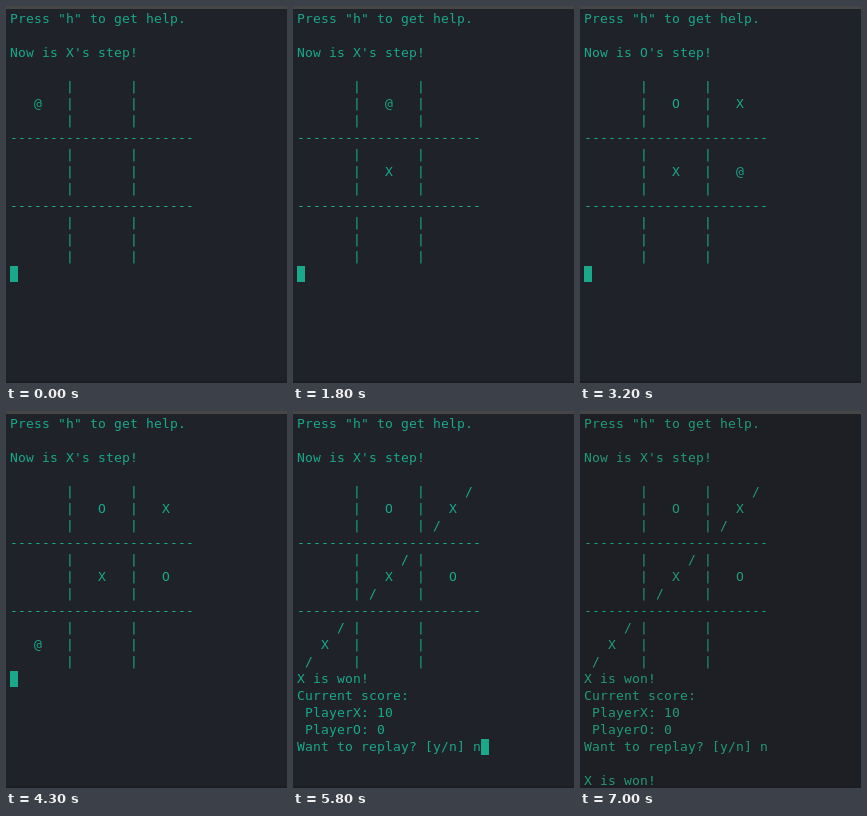
These frames come from a looping animation (281x377 px, 7400 ms). An HTML page with a canvas:

```html
<!DOCTYPE html>
<html lang="en">
<head>
<meta charset="utf-8">
<title>Terminal tic-tac-toe</title>
<style>
  html, body { margin: 0; width: 100%; height: 100%; overflow: hidden; background: #1f2229; }
  canvas { display: block; width: 281px; height: 377px; }
</style>
</head>
<body>
<canvas id="term" width="281" height="377"></canvas>
<script>
const LOOP = 7400;
const CELL = 8, LINE = 17, LEFT = 4, TOP = 5, BASE = 12;
const FONT = '13px "DejaVu Sans Mono", monospace';
const BRIGHT = { ink: '#1aa88a', paper: '#1f2229' };
const DIM = { ink: '#219a77', paper: '#1e1f24' };

// Each step changes part of the state. Squares are numbered 0-8, row by row.
const steps = [
  { at: 0, turn: 'X', pick: 0 },
  { at: 200, pick: 3 },
  { at: 500, pick: 4 },
  { at: 900, turn: 'O', pick: null, put: [4, 'X'] },
  { at: 1400, pick: 1 },
  { at: 1800, turn: 'X' },
  { at: 1900, pick: null, put: [1, 'O'] },
  { at: 2300, pick: 2 },
  { at: 2800, turn: 'O', pick: null, put: [2, 'X'] },
  { at: 3200, pick: 5 },
  { at: 3600, turn: 'X', pick: null, put: [5, 'O'] },
  { at: 3900, pick: 8 },
  { at: 4100, pick: 7 },
  { at: 4300, pick: 6 },
  { at: 4700, pick: null, put: [6, 'X'], won: true },
  { at: 5800, answer: 'n' },
  { at: 6400, done: true },
  { at: 7000, theme: DIM }
];

const ctx = document.getElementById('term').getContext('2d');

function stateAt(time) {
  const state = { marks: {}, answer: '', theme: BRIGHT };
  for (const step of steps) {
    if (step.at > time) break;
    Object.assign(state, step);
    if (step.put) state.marks[step.put[0]] = step.put[1];
  }
  return state;
}

function write(text, row, col = 0) {
  [...text].forEach((ch, i) => {
    if (ch !== ' ') ctx.fillText(ch, LEFT + (col + i) * CELL, TOP + row * LINE + BASE);
  });
}

function mark(ch, square) {
  write(ch, 5 + 4 * Math.floor(square / 3), 3 + 8 * (square % 3));
}

function drawBoard(state) {
  for (let row = 4; row < 15; row++) {
    write(row % 4 === 3 ? '-'.repeat(23) : '       |       |', row);
  }
  for (const square in state.marks) mark(state.marks[square], +square);
  if (state.pick !== null) mark('@', state.pick);
  if (state.won) {
    for (let i = 0; i < 6; i++) write('/', 4 + 2 * i, 21 - 4 * i);
  }
}

function draw(time) {
  const state = stateAt(time);
  ctx.fillStyle = state.theme.paper;
  ctx.fillRect(0, 0, 281, 377);
  ctx.fillStyle = '#464646';
  ctx.fillRect(0, 0, 281, 3);
  ctx.fillStyle = '#1b1d23';
  ctx.fillRect(0, 375, 281, 2);

  ctx.font = FONT;
  ctx.fillStyle = state.theme.ink;
  write('Press "h" to get help.', 0);
  write(`Now is ${state.turn}'s step!`, 2);
  drawBoard(state);

  let row = 15, col = 0;
  if (state.won) {
    const prompt = 'Want to replay? [y/n] ' + state.answer;
    ['X is won!', 'Current score:', ' PlayerX: 10', ' PlayerO: 0', prompt]
      .forEach((text, i) => write(text, 15 + i));
    row = 19;
    col = prompt.length;
  }
  if (state.done) write('X is won!', 21);
  else ctx.fillRect(LEFT + col * CELL, TOP + row * LINE, CELL, 16);
}

const start = performance.now();
function tick() {
  draw((performance.now() - start) % LOOP);
  requestAnimationFrame(tick);
}
tick();
</script>
</body>
</html>
```
